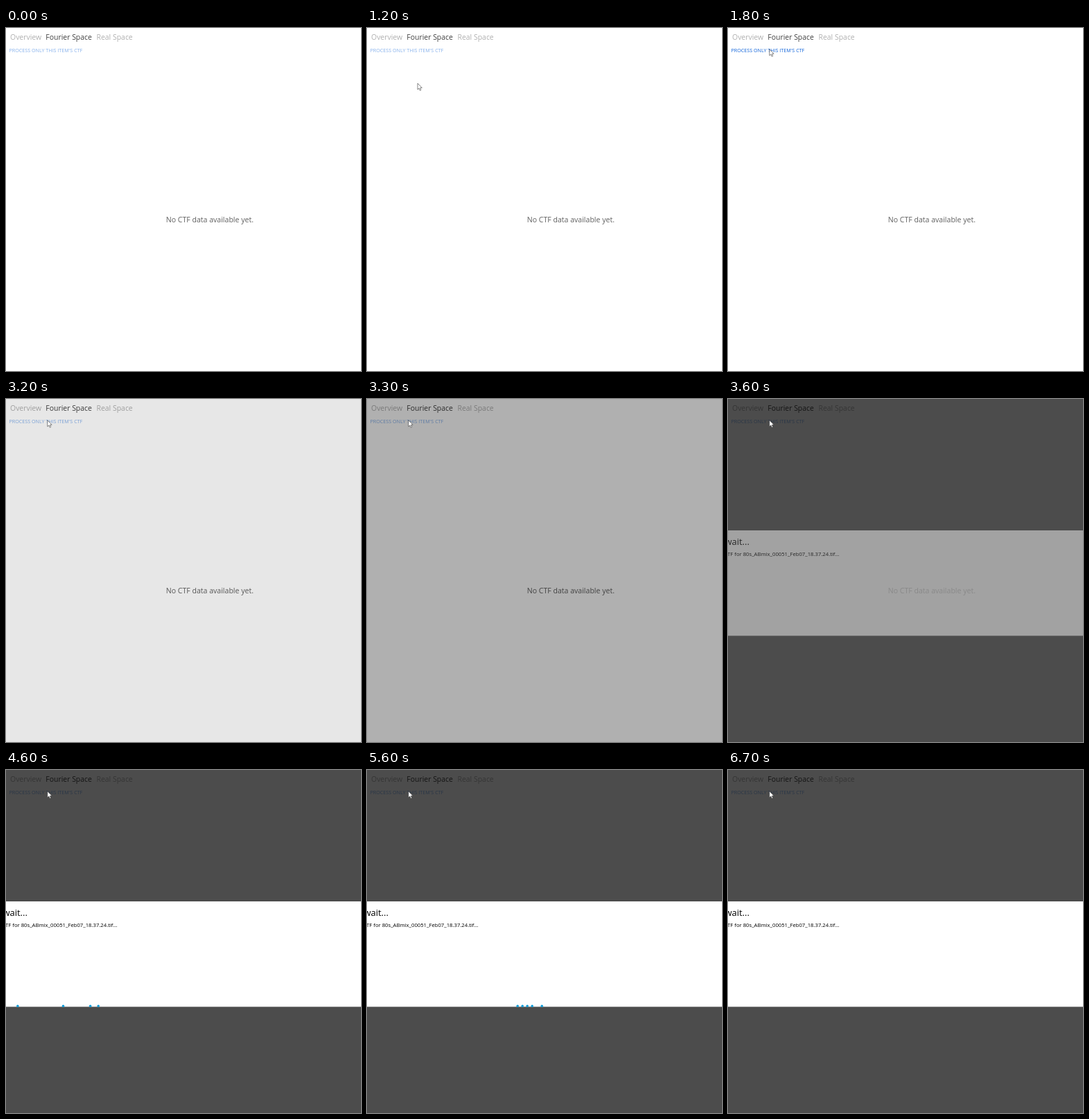
An HTML page with a canvas for the animation above (8000 ms loop, 512 by 496 pixels).

```html
<!DOCTYPE html>
<html lang="en">
<head>
<meta charset="utf-8">
<title>CTF processing dialog</title>
<style>
html, body { margin: 0; width: 100%; height: 100%; overflow: hidden; background: #fff; }
canvas { display: block; width: 512px; height: 496px; }
</style>
</head>
<body>
<canvas id="stage" width="512" height="496"></canvas>
<script>
const LOOP = 8000, STEP = 100;
const W = 512, H = 496;
const DIALOG = { top: 190, height: 152.4 };
const ctx = document.getElementById('stage').getContext('2d');

const clamp = (v, lo = 0, hi = 1) => Math.min(hi, Math.max(lo, v));
const mix = (a, b, k) => a + (b - a) * k;
const gray = v => `rgb(${v},${v},${v})`;

// Cubic Bezier easing (0.4, 0, 0.6, 1), solved by bisection.
function ease(x) {
  if (x <= 0) return 0;
  if (x >= 1) return 1;
  let lo = 0, hi = 1, s = 0.5;
  for (let i = 0; i < 24; i++) {
    s = (lo + hi) / 2;
    const bx = 1.2 * s * (1 - s) ** 2 + 1.8 * s * s * (1 - s) + s ** 3;
    if (bx < x) lo = s; else hi = s;
  }
  return s * s * (3 - 2 * s);
}

function label(text, x, y, size, color, align = 'left') {
  ctx.font = `${size}px "Open Sans", "Noto Sans", sans-serif`;
  ctx.textAlign = align;
  ctx.fillStyle = color;
  ctx.fillText(text, x, y);
}

function drawPage(t) {
  ctx.fillStyle = '#fff';
  ctx.fillRect(0, 0, W, H);
  label('Overview', 6, 17, 10.45, '#b0b0b0');
  label('Fourier Space', 57.3, 17, 10.45, '#404040');
  label('Real Space', 130.5, 17, 10.45, '#b0b0b0');
  const hover = t < 3200 ? clamp((t - 1400) / 300) : 0;
  ctx.globalAlpha = mix(0.5, 1, hover);
  label("PROCESS ONLY THIS ITEM'S CTF", 4.5, 35, 7.16, '#1265da');
  ctx.globalAlpha = 1;
  label('No CTF data available yet.', 230.8, 280.6, 10.55, '#606060');
}

function drawOverlay(t) {
  if (t < 3200) return;
  const alpha = Math.min(0.7, 0.094 + (t - 3200) * 0.00216);
  ctx.fillStyle = `rgba(0,0,0,${alpha})`;
  ctx.fillRect(0, 0, W, H);
}

function drawDialog(t) {
  const alpha = clamp((t - 3510) * 0.0053);
  if (!alpha) return;
  ctx.fillStyle = `rgba(255,255,255,${alpha})`;
  ctx.fillRect(0, DIALOG.top, W, DIALOG.height);
  const ink = gray(Math.round(76 * (1 - alpha)));
  label('Please wait...', 31, 210.6, 13, ink, 'right');
  label('Processing CTF for 80s_ABmix_00051_Feb07_18.37.24.tif...', 160.6, 226.6, 7.7, ink, 'right');
}

// Five dots rush in, drift together, then rush out one by one.
function drawDots(t) {
  if (t < 4200 || t >= 6700) return;
  const sec = t / 1000, rush = 249;
  ctx.fillStyle = '#119eda';
  for (let i = 0; i < 5; i++) {
    const age = sec - 3.525 - 0.168 * i;
    const drift = 178 + 112 * (sec - 5) - 7 * i;
    const exit = ease(age - 1.96 + 0.02 * i);
    const x = drift + rush * (ease(age) - 1 + exit);
    ctx.beginPath();
    ctx.arc(x, 341.3, 1.8, 0, 2 * Math.PI);
    ctx.fill();
  }
}

function drawCursor(t) {
  if (t < 1200) return;
  const k = 1 - (1 - clamp((t - 1200) / 600)) ** 2;
  ctx.save();
  ctx.translate(mix(73, 59.8, k), mix(80, 30.8, k));
  ctx.beginPath();
  [[0, 0], [0, 9], [2, 7.2], [3.4, 10.4], [4.9, 9.7], [3.6, 6.7], [6.3, 6.5]]
    .forEach(([x, y]) => ctx.lineTo(x, y));
  ctx.closePath();
  ctx.fillStyle = '#fff';
  ctx.fill();
  ctx.lineWidth = 0.6;
  ctx.strokeStyle = '#333';
  ctx.stroke();
  ctx.restore();
}

function draw(now) {
  const t = Math.floor((now % LOOP) / STEP) * STEP;
  drawPage(t);
  drawOverlay(t);
  drawDialog(t);
  drawDots(t);
  drawCursor(t);
}

const start = performance.now();
function tick() {
  draw(performance.now() - start);
  requestAnimationFrame(tick);
}
tick();
</script>
</body>
</html>
```
